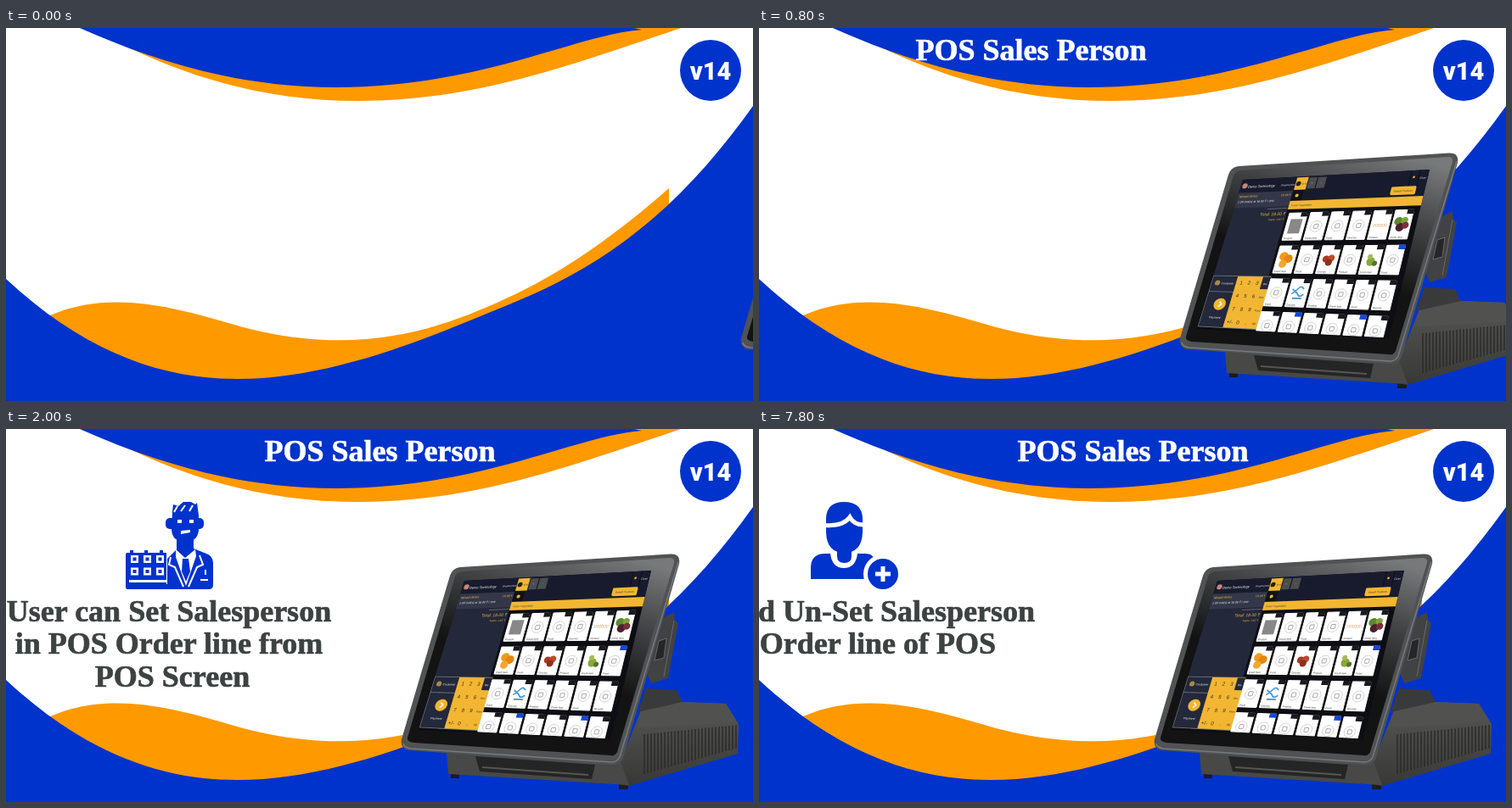
Write an HTML page that moves like this. It is 880 by 440 pixels and loops after 8 s.

```html
<!DOCTYPE html>
<html lang="en">
<head>
<meta charset="utf-8">
<title>POS Sales Person</title>
<style>
  html, body { margin: 0; width: 100%; height: 100%; overflow: hidden; background: #fff; }
  svg { display: block; }
  .serif { font: bold 36px "Liberation Serif", serif; stroke: currentColor; stroke-width: .7px; }
  .badge { font: 900 29px Roboto, sans-serif; }
  #screen { font-family: "Liberation Sans", sans-serif; }
  .blue { fill: #03c; }
  .orange { fill: #f90; }
  .white { fill: #fff; color: #fff; }
  .copy { fill: #3c4242; color: #3c4242; }
</style>
</head>
<body>
<svg width="880" height="440" viewBox="0 0 880 440">
  <defs>
    <linearGradient id="glass" x1=".85" y1="0" x2=".5" y2=".8">
      <stop offset="0" stop-color="#77797b"/><stop offset=".35" stop-color="#434446"/><stop offset=".75" stop-color="#131313"/>
    </linearGradient>
    <linearGradient id="side" x2="0" y2="1">
      <stop offset="0" stop-color="#565754"/><stop offset="1" stop-color="#383936"/>
    </linearGradient>
  </defs>

  <path class="orange" d="M140 21C220 60 310 86 415 86C550 86 660 46 795 0H87Z"/>
  <path class="blue" d="M87 0C170 37 270 70 388 70C560 70 670 8 749 2L740 0Z"/>
  <path class="orange" d="M52 339C140 300 240 345 300 358C430 386 520 352 600 314C660 285 720 243 781 189V440H100Z"/>
  <path class="blue" d="M0 296C90 380 180 414 272 414C390 414 510 360 600 323C730 270 810 190 880 92V440H0Z"/>
  <circle class="blue" cx="830" cy="50" r="36"/>
  <text class="badge white" x="830" y="61" text-anchor="middle">v14</text>

  <text id="title" class="serif white" x="304.5" y="38">POS Sales Person</text>

  <g id="setSlide" class="copy">
    <g class="blue">
      <path d="M236 97L237 89L243 91L249 86H258L263 89L265 87L267 102V119Q266 133 251 133Q236 133 235 119Z"/>
      <rect x="228" y="105" width="45" height="13" rx="5"/>
      <path d="M241 130H261V141L276 147Q284 150 284 158V184Q284 189 279 189H236V184H230V153L241 142Z"/>
      <path d="M181 148Q181 146 183 146H229V183H240V189H183Q181 189 181 186Z"/>
      <path d="M186 143h4v5h-4zM203 143h4v5h-4zM221 143h4v5h-4z"/>
    </g>
    <path class="white" d="M240 142L251 152L263 142L264 150L252 185L240 151Z"/>
    <path class="blue" d="M241 136H261V141L251 149L241 141ZM248 153H255L257 168L252 180L247 168Z"/>
    <path d="M238 98L242 91M246 97L251 90M256 97L260 90M234 151L232 160L239 163L249 186M268 149L272 160L265 163L255 186M269 178H278M275 166V172" fill="none" stroke="#fff" stroke-width="2"/>
    <path class="white" d="M242 107h5v4h-5zM256 107h5v4h-5zM246 120L257 119V122L246 124Z"/>
    <path d="M187 153.500H226M187 168H226" fill="none" stroke="#fff" stroke-width="9" stroke-dasharray="9 6"/>
    <path d="M189.500 153.500H226M189.500 168H226" fill="none" stroke="#03c" stroke-width="4" stroke-dasharray="4 11"/>
    <path class="white" d="M185 178H229V181H185Z"/>
    <g class="serif" text-anchor="middle">
      <text x="232" y="227">User can Set Salesperson</text>
      <text x="232" y="265">in POS Order line from</text>
      <text x="236" y="304">POS Screen</text>
    </g>
  </g>

  <g id="unsetSlide" class="copy">
    <path class="blue" d="M61 177V164Q61 147 78 147H84Q86 164 100 164Q114 164 116 147H125Q137 147 137 160V177ZM92 140H109V150Q109 158 100.500 158Q92 158 92 150Z"/>
    <path class="blue" d="M79 116V105Q80 86 100 86Q121 86 122 105V122Q121 146 100.500 146Q80 146 79 122Z"/>
    <path d="M78 113.500Q99 115 107 104Q112 113 123 113" fill="none" stroke="#fff" stroke-width="5"/>
    <circle cx="146" cy="171" r="20.500" class="blue" stroke="#fff" stroke-width="5"/>
    <path d="M137 171H155M146 162V180" stroke="#fff" stroke-width="5"/>
    <g class="serif" text-anchor="end">
      <text x="325" y="227">Set and Un-Set Salesperson</text>
      <text x="279" y="265">in Order line of POS</text>
    </g>
  </g>

  <g id="device">
    <path d="M524 405h10v7h-10zM722 416h11v9h-11z" fill="#1c1c1c"/>
    <path d="M722 398L748 332L795 322L848 324L863 348L862 383L734 421L722 419Z" fill="url(#side)"/>
    <path d="M748 332L795 322L848 324L861 346L744 352Z" fill="#51524f"/>
    <path id="ribs" stroke="#2b2c2a" stroke-width="1.500"/>
    <path d="M519 382L724 392L734 420L521 407Z" fill="#484946"/>
    <path d="M553 386L694 396L690 413L558 404Z" fill="#252525"/>
    <path d="M561 399L686 408" stroke="#555" stroke-width="2"/>
    <path d="M754 306L790 308L797 322L744 334Z" fill="#393a3b"/>
    <path d="M775 222L787 216L788 226L792 229L780 294L760 300L755 288Z" fill="#414244"/>
    <path d="M787 226L775 292M769 250L778 247L775 270L764 273Z" fill="#252627" stroke="#66686a"/>
    <path d="M466 366L523 173Q526 164 535 163L783 147.500Q795 147 793 159L727 388Q723 397 712 396L474 379Q464 376 466 366Z" fill="#505254"/>
    <path d="M468 371Q469 376 477 377L713 393Q720 393 723 387L792 157" fill="none" stroke="#777a7c" stroke-width="1.500"/>
    <path d="M473 364L529 174Q531 169 537 168L782 152Q788 152 787 158L720 381Q718 386 712 385L480 370Q472 369 473 364Z" fill="url(#glass)"/>
    <g id="screen"></g>
  </g>
</svg>

<script>
const $ = id => document.getElementById(id);

// The tilted screen: u and v run from 0 to 1 across and down it.
const point = (u, v) => [540 - 54 * v + u * (220 + 6 * v), 179 + 176 * v + u * (24 * v - 12)];
const panel = (u, v, w, h, fill, extra = '') =>
  `<polygon points="${[[u, v], [u + w, v], [u + w, v + h], [u, v + h]].map(c => point(...c))
    .join(' ')}" fill="${fill}" ${extra}/>`;
const place = (u, v, inner) =>
  `<g transform="matrix(1 ${(24 * v - 12) / 221} ${(6 * u - 54) / (176 + 24 * u)} 1 ${point(u, v).join(' ')})">${inner}</g>`;
const label = (u, v, text, size = 4, fill = '#fff', anchor = 'start') =>
  place(u, v, `<text font-size="${size}" fill="${fill}" text-anchor="${anchor}">${text}</text>`);
const dot = (x, y, r, fill) => `<circle cx="${x}" cy="${y}" r="${r}" fill="${fill}"/>`;

const gold = '#f2b632', navy = '#24283b';
const placeholder = '<circle r="6.500" fill="none" stroke="#ccc" stroke-width=".8"/><rect x="-2.500" y="-2.500" width="5" height="5" rx="1" fill="none" stroke="#aaa"/>';
const pictures = {
  '0,0': '<rect x="-7" y="-9" width="14" height="17" fill="#888"/>',
  '4,0': '<text y="2" font-size="5" fill="#d9a05b" text-anchor="middle">000000</text>',
  '5,0': dot(-4, -4, 5, '#5c8a2d') + dot(3, -5, 4, '#7ba63a') + dot(-1, 3, 5, '#4b2030') + dot(5, 1, 4, '#7c3038'),
  '0,1': dot(-3, -4, 5, '#f39a1c') + dot(3, -1, 5, '#e5870f') + dot(-2, 5, 4.500, '#f6a62b'),
  '2,1': dot(-3, -1, 4, '#a63b22') + dot(3, -2, 4, '#b94b2c') + dot(1, 3, 4, '#8f301c'),
  '4,1': dot(0, 2, 5, '#86a83b') + dot(-2, -4, 3, '#a4bd57') + dot(5, 4, 3, '#56752c'),
  '1,2': '<path d="M-7-5q3 5 6 0t7 0M-7 1q4-5 7 0t7 0M-5 6H6" fill="none" stroke="#4a9bd8" stroke-width="1.800"/>'
};
const blueTags = ['5,1', '1,3', '4,3'];

function card(col, row) {
  const key = col + ',' + row, u = .306 + .113 * col, v = .235 + .211 * row;
  const h = Math.min(.174, .99 - v), tag = blueTags.includes(key) ? '#1648d8' : '#191a1f';
  return panel(u, v, .097, h, '#fff', 'stroke="#fff" stroke-linejoin="round"') +
    place(u + .048, v + .088, row < 3 ? pictures[key] || placeholder : placeholder) +
    panel(u + .064, v - .004, .036, .028, tag) +
    (row < 3 ? label(u + .006, v + .168, ['Product', 'Fresh item', 'Food', 'Grocery'][(col + row) % 4], 3, '#333') : '');
}

function drawScreen() {
  const parts = [
    panel(0, 0, 1, 1, '#0d0e13'),
    panel(0, 0, 1, .155, '#171b2d'),
    place(.022, .043, dot(0, 0, 3, '#c9847c')),
    label(.04, .058, 'Demo Technology', 4),
    label(.215, .055, 'Shopping Mart', 2.600),
    panel(.293, .005, .062, .08, gold),
    place(.309, .045, dot(0, 0, 2.800, '#222')),
    label(.327, .052, '10:42', 2.500, '#222'),
    panel(.36, .01, .042, .07, '#4b4d50'), panel(.408, .01, .045, .07, '#4b4d50'),
    label(.375, .053, '+', 4, '#aaa'), label(.425, .053, '−', 4, '#aaa'),
    panel(.905, 0, .003, .09, '#090a10'), panel(.95, 0, .003, .09, '#090a10'),
    place(.925, .04, dot(0, 0, 1.300, gold)), label(.957, .052, 'Close', 3),

    panel(0, .09, .29, .55, navy), panel(0, .09, .29, .1, '#333749'),
    label(.01, .122, 'Mixed items', 4, gold), label(.285, .122, '18.00 ₹', 3.500, gold, 'end'),
    label(.01, .157, '1.00 Unit(s) at 18.00 ₹ / Unit', 3.400),
    panel(.18, .2, .105, .004, '#777'),
    label(.285, .247, 'Total: 18.00 ₹', 5, gold, 'end'), label(.285, .28, 'Taxes: 2.67 ₹', 3.200, gold, 'end'),

    panel(.292, .09, .055, .062, '#101218'), place(.318, .122, dot(0, 0, 2, gold)),
    panel(.825, .101, .12, .035, gold, `stroke="${gold}" stroke-width="3" stroke-linejoin="round"`),
    label(.885, .126, 'Search Products', 3, '#333', 'middle'),
    panel(.29, .155, .71, .056, gold), label(.303, .191, 'Food / Vegetables', 3, '#444'),

    panel(0, .64, .305, .345, '#777b86'), panel(.003, .645, .127, .1, navy), panel(.003, .75, .127, .23, navy),
    place(.033, .69, dot(0, 0, 3, '#a68b42')), label(.054, .699, 'Customer', 3.400),
    place(.078, .83, dot(0, 0, 7, gold) + '<path d="M-1-3L2 0L-1 3" fill="none" stroke="#fff" stroke-width="1.500"/>'),
    label(.073, .925, 'Payment', 3.400, '#fff', 'middle'),
    panel(.13, .645, .175, .335, gold), panel(.263, .645, .042, .08, navy)
  ];
  ['1', '2', '3', 'Qty', '4', '5', '6', 'Disc', '7', '8', '9', 'Price', '+/-', '0', '.', '⌫'].forEach((key, i) => {
    const col = i % 4, row = i >> 2;
    parts.push(label(.157 + .042 * col, .697 + .086 * row, key, col == 3 ? 3 : 6, i == 3 ? '#fff' : '#363020', 'middle'));
  });
  for (let row = 0; row < 4; row++)
    for (let col = 0; col < 6; col++) parts.push(card(col, row));
  $('screen').innerHTML = parts.join('');
}

function drawRibs() {
  let d = '';
  for (let x = 752; x < 861; x += 4) d += `M${x} ${360 - (x - 752) * .1}V${407 - (x - 752) * .28}`;
  $('ribs').setAttribute('d', d);
}

// Offsets from the resting place, one per step; the last one holds.
const STEP = 200, LOOP = 8000;
const tracks = [
  { id: 'title', from: 0, to: 40, offsets: [-530, -430, -330, -230, -120, 0] },
  { id: 'device', from: 0, to: 40, offsets: [400, 300, 200, 100, 30, 0] },
  { id: 'setSlide', from: 6, to: 36, offsets: [-400, -320, -230, -140, -40, 0] },
  { id: 'unsetSlide', from: 36, to: 40, offsets: [-310, -210, -100, 0] }
];

function frame() {
  const step = Math.floor(performance.now() % LOOP / STEP);
  for (const { id, from, to, offsets } of tracks) {
    const shown = step >= from && step < to;
    $(id).style.display = shown ? '' : 'none';
    if (shown) $(id).setAttribute('transform', `translate(${offsets[Math.min(step - from, offsets.length - 1)]})`);
  }
  requestAnimationFrame(frame);
}

drawScreen();
drawRibs();
frame();
</script>
</body>
</html>
```
